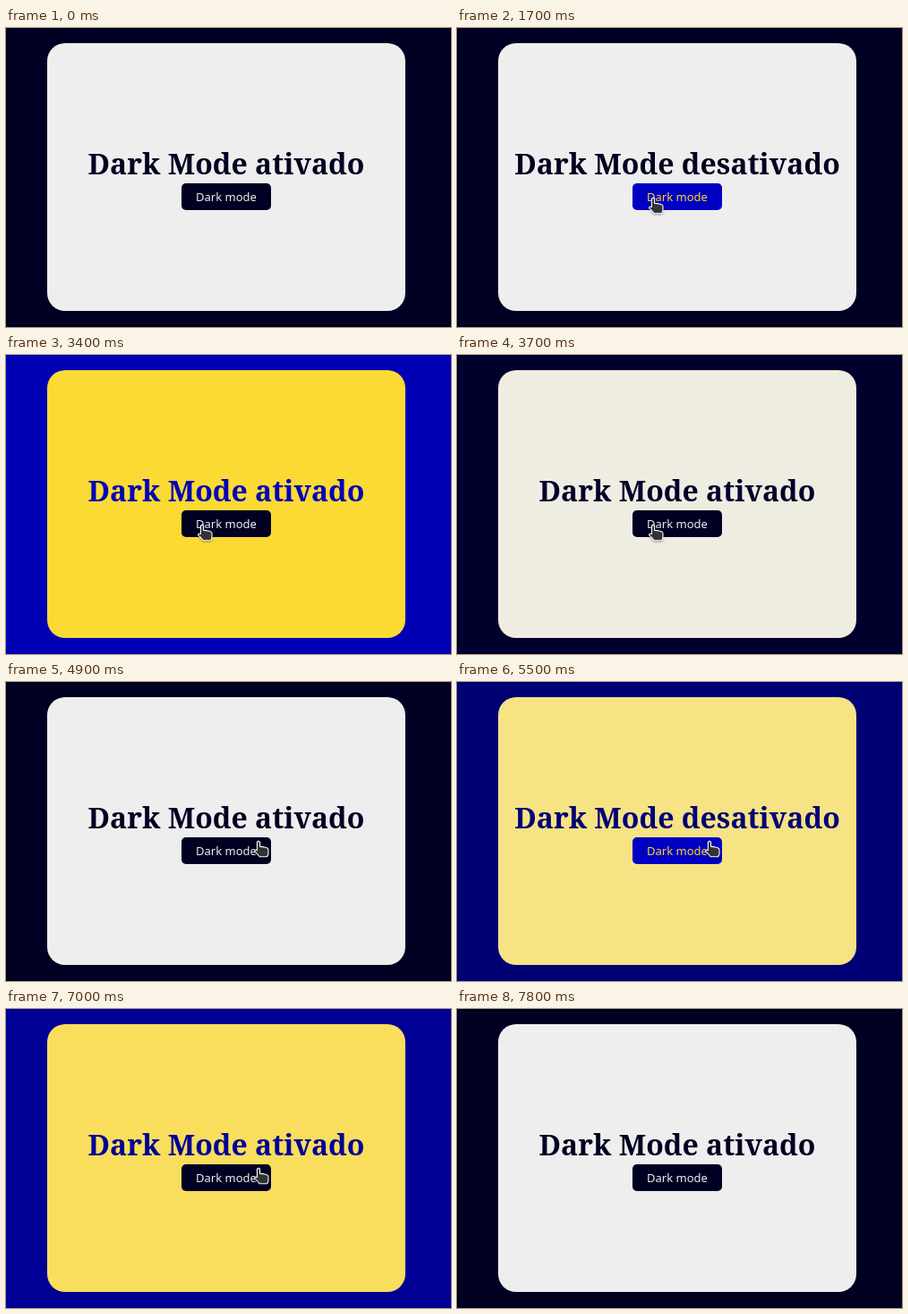
Write an HTML page that moves like this. It is 497 px wide and 335 px high and loops after 9.7 s.

```html
<!DOCTYPE html>
<html lang="pt">
<head>
<meta charset="utf-8">
<title>Dark mode</title>
<style>
  html, body { margin: 0; width: 100%; height: 100%; overflow: hidden; }
  svg { display: block; }
  text { text-anchor: middle; }
  #title { font: bold 32px "Noto Serif", serif; }
  #label { font: 500 13px "Noto Sans", sans-serif; }
  #cursor { filter: drop-shadow(0 1px 1px rgba(0, 0, 0, .4)); }
  #cursor path { fill: #333; stroke: #fff; stroke-width: 1.1; stroke-linejoin: round; }
</style>
</head>
<body>
<svg width="497" height="335" viewBox="0 0 497 335">
  <rect id="page" width="497" height="335"/>
  <rect id="card" x="46" y="17" width="400" height="300" rx="20"/>
  <text id="title" x="246" y="164"></text>
  <rect id="button" x="196" y="174" width="100" height="30" rx="5"/>
  <text id="label" x="246" y="194">Dark mode</text>
  <g id="cursor">
    <path id="hand" d="M-1.6 1.6Q0-.8 1.6 1.6V6.4L4.5 6.6 7.5 7.2 9.8 8Q11 8.5 11 10V13.5Q11 15.5 9.6 17.8H1.2Q0 15.5-4.4 11.8Q-4.4 9.4-1.6 10.6Z"/>
    <path id="arrow" d="M0 0V15L3.5 11.8 6 17 8.3 16 6 11H10.5Z"/>
  </g>
</svg>
<script>
const LOOP = 9700, TICK = 100, FADE = 500;
const DARK = { ink: [0, 0, 34], paper: [238, 238, 238] };
const LIGHT = { ink: [0, 0, 196], paper: [254, 216, 32] };

// Moments at which the theme is toggled
const toggles = [1700, 3350, 5350, 6900];

// Pointer: time, x, y
const SHOW = 200, HIDE = 7800;
const path = [
  [200, 108, 328], [300, 124, 314], [500, 146, 287], [900, 205, 205],
  [1100, 222, 189], [1200, 220, 189], [1400, 219, 190],
  [4000, 219, 190], [4200, 226, 206], [4500, 270, 266], [4700, 276, 212], [4900, 282, 178],
  [7600, 282, 178], [7700, 276, 203]
];

const $ = id => document.getElementById(id);
const mix = (a, b, p) => a + (b - a) * p;
const blend = (a, b, p) => `rgb(${a.map((v, i) => Math.round(mix(v, b[i], p)))})`;
const fill = (id, color) => $(id).setAttribute("fill", color);
const show = (id, on) => $(id).setAttribute("visibility", on ? "visible" : "hidden");

// CSS "ease": cubic-bezier(.25, .1, .25, 1)
function ease(x) {
  if (x <= 0 || x >= 1) return x <= 0 ? 0 : 1;
  const bezier = (a, b, s) => 3 * a * s * (1 - s) ** 2 + 3 * b * s * s * (1 - s) + s ** 3;
  let lo = 0, hi = 1;
  for (let i = 0; i < 20; i++) {
    const mid = (lo + hi) / 2;
    if (bezier(.25, .25, mid) < x) lo = mid; else hi = mid;
  }
  return bezier(.1, 1, lo);
}

function pointerAt(t) {
  const i = path.findIndex(p => p[0] > t);
  if (i < 0) return path[path.length - 1].slice(1);
  if (i === 0) return path[0].slice(1);
  const [t0, x0, y0] = path[i - 1], [t1, x1, y1] = path[i];
  const p = (t - t0) / (t1 - t0);
  return [mix(x0, x1, p), mix(y0, y1, p)];
}

function drawTheme(t) {
  const count = toggles.filter(s => s <= t).length;
  const light = count % 2 === 1;
  const now = light ? LIGHT : DARK, before = light ? DARK : LIGHT;
  const p = count ? ease((t - toggles[count - 1]) / FADE) : 1;
  const ink = blend(before.ink, now.ink, p);
  fill("page", ink);
  fill("title", ink);
  fill("card", blend(before.paper, now.paper, p));
  fill("button", blend(now.ink, now.ink, 1));
  fill("label", blend(now.paper, now.paper, 1));
  $("title").textContent = `Dark Mode ${light ? "desativado" : "ativado"}`;
}

function drawPointer(t) {
  const on = t >= SHOW && t < HIDE;
  const [x, y] = pointerAt(t);
  const over = x >= 196 && x <= 296 && y >= 174 && y < 203;
  $("cursor").setAttribute("transform", `translate(${Math.round(x)} ${Math.round(y)})`);
  show("hand", on && over);
  show("arrow", on && !over);
}

function frame(now) {
  const t = Math.floor(now % LOOP / TICK) * TICK;
  drawTheme(t);
  drawPointer(t);
  requestAnimationFrame(frame);
}
frame(0);
</script>
</body>
</html>
```
